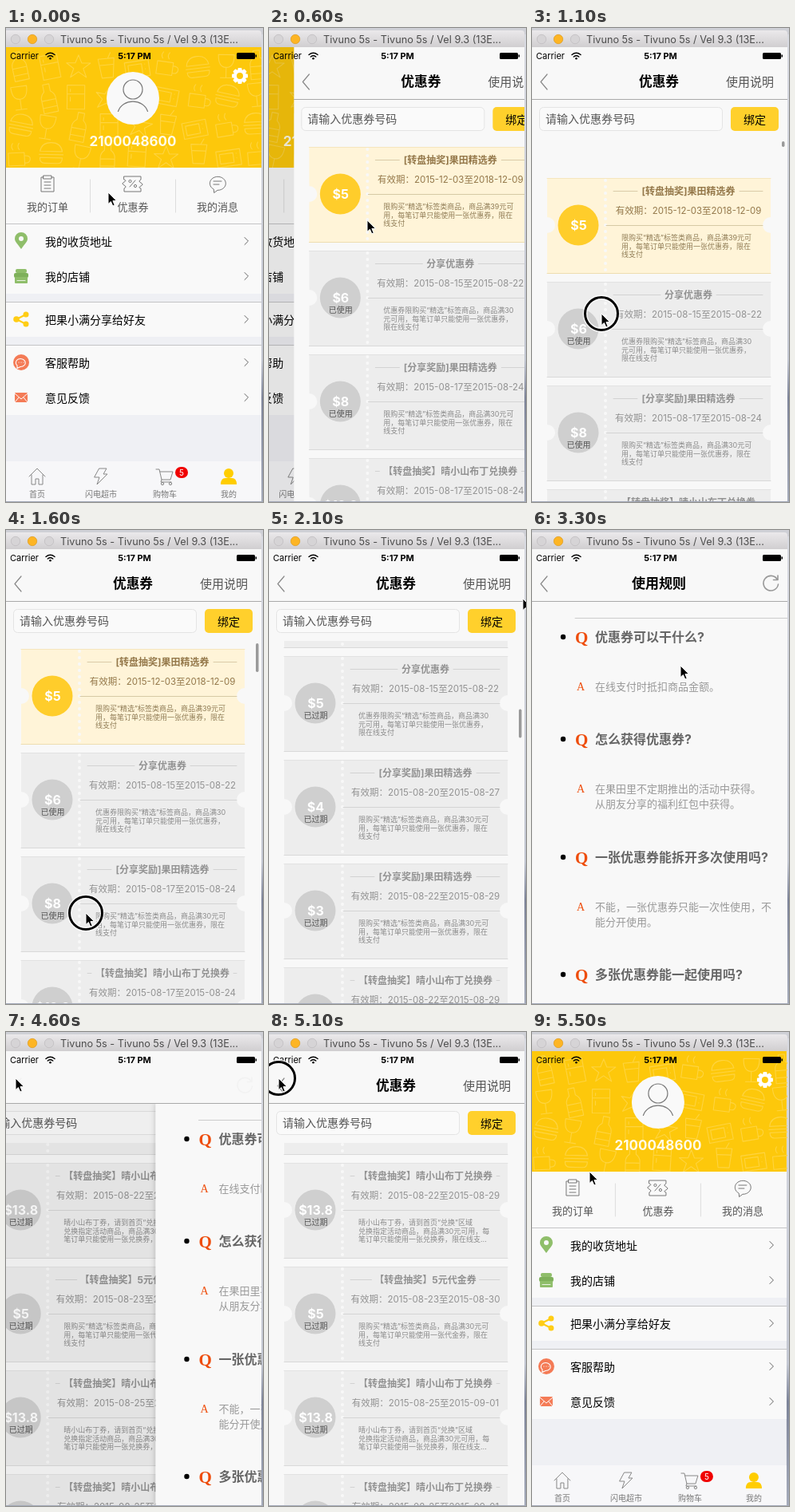
These frames come from a looping animation (322x594 px, 5600 ms). An HTML page:

```html
<!DOCTYPE html>
<html lang="zh-CN">
<head>
<meta charset="utf-8">
<style>
html, body { margin: 0; width: 100%; height: 100%; overflow: hidden; background: #f8f8f8; }
svg { display: block; }
text { font-family: Inter, "Noto Sans CJK SC", "Noto Sans CJK", sans-serif; white-space: pre; }
.serif { font-family: "Liberation Serif", serif; }
.mid { text-anchor: middle; }
.bold { font-weight: 700; }
.line { fill: none; stroke-linecap: round; stroke-linejoin: round; }
</style>
</head>
<body>
<svg id="stage" width="322" height="594" viewBox="0 0 322 594"></svg>
<script>
const text = (x, cy, size, str, fill = '#000', cls = '') =>
  `<text x="${x}" y="${cy + size * 0.37}" font-size="${size}" fill="${fill}" class="${cls}">${str}</text>`;
const rect = (x, y, w, h, fill, extra = '') =>
  `<rect x="${x}" y="${y}" width="${w}" height="${h}" fill="${fill}" ${extra}/>`;
const circle = (x, y, r, fill, extra = '') =>
  `<circle cx="${x}" cy="${y}" r="${r}" fill="${fill}" ${extra}/>`;
const path = (d, stroke, width = 1, extra = '') =>
  `<path class="line" d="${d}" stroke="${stroke}" stroke-width="${width}" ${extra}/>`;
const at = (x, y, body) => `<g transform="translate(${x} ${y})">${body}</g>`;
const rule = (x1, x2, y, color) => path(`M${x1} ${y}H${x2}`, color);

// Profile screen
const doodles = [
  'M-4-18h8v9q5 4 5 9v18h-18v-18q0-5 5-9zM-9 2h18M-9 11h18',
  'M-10-12h20l-3 24h-14zM-8-4h16M2-12l4-7',
  'M-14-3Q-12-14 0-14T14-3zM-15 1h30M-14 5h28q0 7-6 7h-16q-6 0-6-7z',
  'M-12-15h22v30h-22zM-12-4h22M-8-10v3M-8 0v5',
  'M-15-8h30v20h-30zM-11-4h17v12h-17zM10-3v.1M10 3v.1',
  'M-10-14q0 16 10 16t10-16zM0 2v12M-7 15h14',
  'M0-15l4 10h11l-9 7 4 11-10-7-10 7 4-11-9-7h11z',
  'M-12-4h20v16h-20zM8 0q8 0 7 5t-7 4M-6-8q-3-4 0-8M2-8q-3-4 0-8'
];
function doodlePattern() {
  let seed = 11, out = '';
  const random = () => (seed = seed * 16807 % 2147483647) / 2147483647;
  for (let row = 0; row < 4; row++) for (let col = 0; col < 9; col++) {
    const turn = random() * 24 - 12;
    const x = 14 + col * 37 + random() * 6, y = 46 + row * 37 + random() * 6;
    out += at(x, y, path(doodles[(col * 3 + row * 5) % 8], '#fed440', 1.1, `transform="rotate(${turn})"`));
  }
  return out;
}

const gear = () => {
  let teeth = '';
  for (let a = 0; a < 360; a += 45) teeth += rect(-2.5, -10, 5, 5, '#fff', `rx="1" transform="rotate(${a})"`);
  return teeth + circle(0, 0, 6, 'none', 'stroke="#fff" stroke-width="4"');
};

const GREY = '#777';
const icons = {
  order: path('M-5-8h-3v18h16v-18h-3M-5-10h10v4h-10zM-4-2h8M-4 2h8M-4 6h8', GREY),
  coupon: path('M-11-9h21v4q-4 2 0 4t0 4 0 3v4h-21v-4q4-2 0-4t0-4 0-3zM3-4L-4 4', GREY) +
    circle(-3.5, -3, 1.6, 'none', `stroke="${GREY}"`) + circle(3, 3, 1.6, 'none', `stroke="${GREY}"`),
  message: path('M-5 7a10 8.5 0 1 1 5 1.3l-4 3zM-5-3h10M-5 1h7', GREY),
  pin: '<path d="M0 10C-4 4-8 1-8-3a8 8 0 0 1 16 0C8 1 4 4 0 10z" fill="#8fbe6a"/>' + circle(0, -3, 3, '#f9f9f9'),
  shop: rect(-7, -9, 14, 5, '#8fbe6a', 'rx="2"') + rect(-9, -4, 18, 6, '#7eb05a', 'rx="2"') +
    rect(-8, 1, 16, 8, '#8fbe6a', 'rx="1"') + rule(-5, 5, 5.5, '#e9f3e2'),
  share: path('M6-6L-6 0L6 6', '#ffcd15', 2) + circle(6, -6, 3.5, '#ffcd15') + circle(-6, 0, 3.8, '#ffcd15') + circle(6, 6, 3.5, '#ffcd15'),
  help: circle(0, 0, 10, '#f47b56') + path('M-5 4a6 5 0 1 1 4 1.5l-4 2zM-3 0h.1M0 0h.1M3 0h.1', '#fff', 1.1),
  mail: rect(-8, -6, 16, 12, '#f47b56', 'rx="1"') + path('M-8-5L0 2L8-5M-8 6l5-6M8 6l-5-6', '#fff', 1),
  home: path('M-10 0L0-10L10 0M-7-2v12h5v-7h4v7h5v-12', '#888'),
  bolt: path('M-2-10h9l-4 7h5l-13 13 3-9h-6z', '#888'),
  cart: path('M-11-9h4l3 13h11l3-10h-16M-4 4l-1 3h13', '#888') + circle(-3, 9, 1.7, 'none', 'stroke="#888"') + circle(7, 9, 1.7, 'none', 'stroke="#888"'),
  me: circle(0, -4, 6, '#ffcd00') + '<path d="M-10 10q0-8 6-8h8q6 0 6 8z" fill="#ffcd00"/>'
};

const menuRow = (y, icon, label) => rect(0, y, 320, 44, '#f9f9f9') + at(19, y + 22, icons[icon]) +
  text(49, y + 22.5, 14, label) + path(`M299 ${y + 17.5}l4.5 4.5l-4.5 4.5`, '#666');

function profileScreen() {
  const shortcuts = [['order', '我的订单', 52], ['coupon', '优惠券', 159], ['message', '我的消息', 265]];
  const tabs = [['home', '首页'], ['bolt', '闪电超市'], ['cart', '购物车'], ['me', '我的']];
  return rect(0, 24, 320, 570, '#eff0f4') + rect(0, 24, 320, 151, '#fdc80b') + doodlePattern() +
    circle(159, 88, 33, '#f9f9f9') +
    circle(159, 77, 12, 'none', `stroke="${GREY}" stroke-width="1.2"`) +
    path('M140.5 104.5C146 88 172 88 177.5 104.5', GREY, 1.2) +
    text(159, 142, 17, '2100048600', '#fffbe8', 'mid bold') + at(293, 60, gear()) +
    rect(0, 175, 320, 70, '#f9f9f9') +
    path('M105.5 190V231M212.5 190V231', '#ddd') +
    shortcuts.map(([icon, label, x]) => at(x, 195, icons[icon]) + text(x, 224, 13, label, '#555', 'mid')).join('') +
    menuRow(245, 'pin', '我的收货地址') + menuRow(289, 'shop', '我的店铺') +
    menuRow(343, 'share', '把果小满分享给好友') +
    menuRow(397, 'help', '客服帮助') + menuRow(441, 'mail', '意见反馈') +
    [245.5, 343.5, 397.5].map(y => rule(0, 320, y, '#c4c4c6')).join('') +
    rect(0, 543, 320, 51, '#f7f7f9') +
    tabs.map(([icon, label], i) => at(39 + 80 * i, 562, icons[icon]) + text(39 + 80 * i, 584, 10, label, '#777', 'mid')).join('') +
    rect(212, 550, 16, 14, '#f00000', 'rx="7"') + text(220, 557, 10, '5', '#fff', 'mid');
}

// Coupon screen
const pickNote = n => [`限购买“精选”标签类商品，商品满${n}元可`, '用，每笔订单只能使用一张优惠券，限在', '线支付'];
const shareNote = ['优惠券限购买“精选”标签商品，商品满30', '元可用，每笔订单只能使用一张优惠券，', '限在线支付'];
const puddingNote = ['晴小山布丁券，请到首页“兑换”区域', '兑换指定活动商品，商品满30元可用，每', '笔订单只能使用一张兑换券，限在线支…'];
const cashNote = ['限购买“精选”标签类商品，商品满30元可', '用，每笔订单只能使用一张代金券，限在', '线支付'];
const kinds = {
  wheel: ['[转盘抽奖]果田精选券', pickNote(39)],
  share: ['分享优惠券', shareNote],
  reward: ['[分享奖励]果田精选券', pickNote(30)],
  pudding: ['【转盘抽奖】晴小山布丁兑换券', puddingNote],
  cash: ['【转盘抽奖】5元代金券', cashNote]
};
const coupons = [
  ['wheel', '5', '', '12-03', '12-09'],
  ['share', '6', '已使用', '08-15', '08-22'], ['reward', '8', '已使用', '08-17', '08-24'],
  ['pudding', '13.8', '已使用', '08-17', '08-24'], ['share', '5', '已过期', '08-12', '08-19'],
  ['reward', '4', '已过期', '08-13', '08-20'], ['reward', '3', '已过期', '08-14', '08-21'],
  ['share', '6', '已过期', '08-15', '08-22'], ['share', '5', '已过期', '08-15', '08-22'],
  ['reward', '4', '已过期', '08-20', '08-27'], ['reward', '3', '已过期', '08-22', '08-29'],
  ['pudding', '13.8', '已过期', '08-22', '08-29'], ['cash', '5', '已过期', '08-23', '08-30'],
  ['pudding', '13.8', '已过期', '08-25', '09-01'], ['pudding', '13.8', '已过期', '08-25', '09-01']
];
const PAPER = '#f8f8f8';

function couponCard([kind, price, state, from, to], i) {
  const [title, note] = kinds[kind], live = !state;
  const ink = live ? '#94784a' : '#929292', stroke = live ? '#d9cba8' : '#d2d2d2';
  const half = [...title].reduce((w, c) => w + (c.charCodeAt(0) > 255 ? 12 : 5), 0) / 2 + 5;
  return at(0, 149 + 130 * i,
    rect(19, 0, 280, 120, live ? '#fff4d8' : '#ededed') +
    rule(19, 299, 0.5, live ? '#f5e6bd' : '#e2e2e2') + rule(19, 299, 119.5, live ? '#eeddb0' : '#d9d9d9') +
    circle(19, 59, 10, PAPER) + circle(299, 59, 10, PAPER) + rect(9, 46, 10, 26, PAPER) + rect(299, 46, 12, 26, PAPER) +
    path('M92 3V120', PAPER, 4, 'stroke-dasharray="0 8"') +
    circle(58, 59, 25.5, live ? '#ffcd2b' : '#cfcfcf') +
    text(58.5, 59, 16, '$' + price, '#fff', 'mid bold') + text(58.5, 74, 10, state, '#555', 'mid') +
    rule(102, Math.max(106, 196 - half), 16.5, stroke) + rule(Math.min(285, 196 + half), 289, 16.5, stroke) +
    text(196, 17, 12, title, ink, 'mid bold') +
    text(196, 41, 11.5, `有效期：2015-${from}至${live ? 2018 : 2015}-${to}`, ink, 'mid') +
    rule(93, 289, 59.5, live ? '#d6c9a5' : '#d4d4d4') +
    note.map((line, n) => text(112, 75 + 10.5 * n, 9, line, live ? '#8f7c55' : '#8a8a8a')).join(''));
}

const couponBody = () => rect(0, 90, 320, 504, PAPER) +
  `<g clip-path="url(#listClip)"><g id="list">${coupons.map(couponCard).join('')}</g></g>` +
  '<rect id="thumb" x="313" width="3.5" rx="1.7" fill="#9a9a9a"/>' +
  rect(9.5, 99.5, 229, 29, '#fafafa', 'rx="5" stroke="#e4e4e4"') + text(17, 114, 14, '请输入优惠券号码', '#555') +
  rect(249, 99, 60, 30, '#ffd02c', 'rx="5"') + text(279, 114.5, 14, '绑定', '#000', 'mid');

// Rules screen
const questions = [
  [134, '优惠券可以干什么?', ['在线支付时抵扣商品金额。']],
  [262, '怎么获得优惠券?', ['在果田里不定期推出的活动中获得。', '从朋友分享的福利红包中获得。']],
  [410, '一张优惠券能拆开多次使用吗?', ['不能，一张优惠券只能一次性使用，不', '能分开使用。']],
  [557, '多张优惠券能一起使用吗?', []]
];
const rulesBody = () => rect(0, 90, 320, 504, PAPER, 'filter="url(#shade)"') +
  `<g id="answers">${rule(54, 320, 110.5, '#ccc')}` +
  questions.map(([y, q, lines]) => circle(39, y, 3.2, '#000') +
    text(54, y + 0.5, 21, 'Q', '#ee4d0c', 'serif bold') + text(79, y, 16, q, '#666', 'bold') +
    (lines.length ? text(56, y + 62, 14, 'A', '#ee4d0c', 'serif') : '') +
    lines.map((line, n) => text(79, y + 62 + 19.5 * n, 13, line, '#999')).join('')).join('') + '</g>';

const navBar = () => rect(0, 24, 320, 66, PAPER) + rule(0, 320, 89.5, '#a9a9a9') +
  path('M19 58L11 67.5L19 77', '#888', 1.2, 'id="back"') +
  `<g id="couponTitle">${text(159, 67, 16.7, '优惠券', '#000', 'mid bold')}</g>` +
  `<g id="couponLink">${text(243, 67, 15, '使用说明', '#555')}</g>` +
  `<g id="rulesTitle">${text(159, 67, 17, '使用规则', '#000', 'mid bold')}</g>` +
  `<g id="reload">${path('M307 61.5A9.3 9.3 0 1 0 308.5 68M308 57v5.5h-5.5', '#999', 1.6)}</g>`;

// Simulator window
const windowBar = () => rect(0, 0, 322, 8, '#cfd0d6') +
  '<path d="M0 24V3H316Q320 3 320 7V24Z" fill="url(#bar)"/>' +
  [['#d6d4d6', '#bdbbbd'], ['#fdb524', '#dd9a1c'], ['#d6d4d6', '#bdbbbd']].map(([fill, edge], i) =>
    circle(12 + 21 * i, 14, 5.7, fill, `stroke="${edge}" stroke-width=".7"`)).join('') +
  text(68, 14.5, 12.7, 'Tivuno 5s - Tivuno 5s / Vel 9.3 (13E...', '#4c4c4c');
const statusBar = () => text(5, 35, 11, 'Carrier') +
  path('M50 33.5q5.5-4.5 11 0M52.3 36q3.2-2.6 6.4 0', '#000', 1.5) + circle(55.5, 38.3, 1.3, '#000') +
  text(161, 35, 11, '5:17 PM', '#000', 'mid bold') +
  rect(289, 31, 23, 8, '#000', 'rx="1.5"') + rect(312.5, 33.5, 1.5, 3, '#000');

document.getElementById('stage').innerHTML = `
<defs>
  <linearGradient id="bar" x2="0" y2="1"><stop stop-color="#ebe9eb"/><stop offset="1" stop-color="#d0ced0"/></linearGradient>
  <linearGradient id="desk" x2="0" y2="1"><stop stop-color="#d9dbe2"/><stop offset=".7" stop-color="#c3c7d2"/>
    <stop offset=".78" stop-color="#7d8499"/><stop offset="1" stop-color="#a5abba"/></linearGradient>
  <clipPath id="listClip">${rect(0, 139, 320, 455, '#000')}</clipPath>
  <clipPath id="screenClip">${rect(0, 24, 320, 569, '#000')}</clipPath>
  <filter id="shade" x="-5%" width="110%"><feDropShadow dx="-1" dy="0" stdDeviation="3" flood-opacity=".18"/></filter>
</defs>
${rect(0, 0, 322, 594, 'url(#desk)')}
<g clip-path="url(#screenClip)">
  <g id="profile">${profileScreen()}</g>
  <rect id="profileDim" y="24" width="320" height="570"/>
  <g id="couponScreen">
    <g id="couponBody">${couponBody()}</g>
    <rect id="couponDim" y="90" width="320" height="504"/>
    <g id="rulesBody">${rulesBody()}</g>
    ${navBar()}
  </g>
  ${statusBar()}
</g>
${windowBar()}
<g id="pointer">
  <g id="ring">${circle(0, 0, 20.5, 'none', 'stroke="#fff" stroke-opacity=".7" stroke-width="6"')}${circle(0, 0, 20.5, 'none', 'stroke="#000" stroke-width="3"')}</g>
  <path d="M0 0V14.500L3.400 11.500L5.800 17L8.200 16L5.900 10.600H10.500Z" fill="#000" stroke="#fff"/>
</g>`;

// Motion
const LOOP = 5600, STEP = 100, RATE = 0.0197;
const el = id => document.getElementById(id);
const clamp = v => Math.min(1, Math.max(0, v));
const move = (id, x, y = 0) => el(id).setAttribute('transform', `translate(${x} ${y})`);
const fade = (id, v) => el(id).setAttribute('opacity', clamp(v));
const spring = ms => ms <= 0 ? 0 : 1 - (1 + ms * RATE) * Math.exp(-ms * RATE);
const shown = (t, open, close) => t >= close ? 1 - spring(t - close) : spring(t - open);

const route = [
  [0, 128, 206], [200, 145, 206], [400, 145, 206], [900, 90, 293], [1000, 87, 295], [1100, 87, 358],
  [1200, 87, 362], [1500, 100, 480], [1600, 100, 480], [1800, 105, 255], [2100, 318, 86], [2500, 282, 67],
  [2700, 282, 67], [3300, 186, 170], [4300, 12, 58], [5200, 12, 58], [5500, 72, 175], [5600, 72, 175]
];
const presses = [[300, 400], [1000, 1200], [1600, 1800], [2600, 2700], [4400, 4500], [5100, 5200]];

function pointerAt(t) {
  const i = route.findIndex(p => p[0] > t);
  const [t0, x0, y0] = route[i - 1], [t1, x1, y1] = route[i];
  const u = (t - t0) / (t1 - t0);
  return [x0 + (x1 - x0) * u, y0 + (y1 - y0) * u];
}

// Rubber-band pull, a flick, then exponential momentum
function scrollAt(t) {
  if (t < 1000) return 0;
  if (t <= 1200) return -39 * clamp((t - 1000) / 100);
  if (t < 1600) return -39 * (1 - spring(t - 1200));
  if (t < 1800) return 225 * ((t - 1600) / 200) ** 1.5;
  return 1415 - 384 * Math.exp((2100 - t) / 265);
}

function draw(now) {
  const t = Math.floor(now % LOOP / STEP) * STEP;
  const c = shown(t, 400, 5170), r = shown(t, 2700, 4500);
  move('profile', -96 * c);
  fade('profileDim', 0.1 * c);
  move('couponScreen', 326 * (1 - c));
  move('couponBody', -96 * r);
  fade('couponDim', 0.1 * r);
  move('rulesBody', 320 * (1 - r) + (r < 0.001 ? 20 : 0));
  fade('answers', t >= 2900 ? 1 : 0);

  const couponNav = 1 - r / 0.4, rulesNav = (r - 0.38) / 0.62;
  fade('back', Math.max(couponNav, rulesNav));
  fade('couponTitle', couponNav);
  fade('couponLink', couponNav);
  fade('rulesTitle', (r - 0.42) / 0.58);
  fade('reload', rulesNav);
  move('couponTitle', -100 * r);
  move('rulesTitle', 120 * (1 - r));

  const s = scrollAt(t), size = Math.max(7, 36 + Math.min(0, s));
  move('list', 0, -s);
  el('thumb').setAttribute('y', 142 + Math.max(0, s) * 0.08);
  el('thumb').setAttribute('height', size);
  fade('thumb', t < 1000 ? 0 : (2900 - t) / 300);

  move('pointer', ...pointerAt(t));
  fade('ring', presses.some(([a, b]) => t >= a && t < b) ? 1 : 0);
}

const start = performance.now();
(function tick() {
  draw(performance.now() - start);
  requestAnimationFrame(tick);
})();
</script>
</body>
</html>
```
